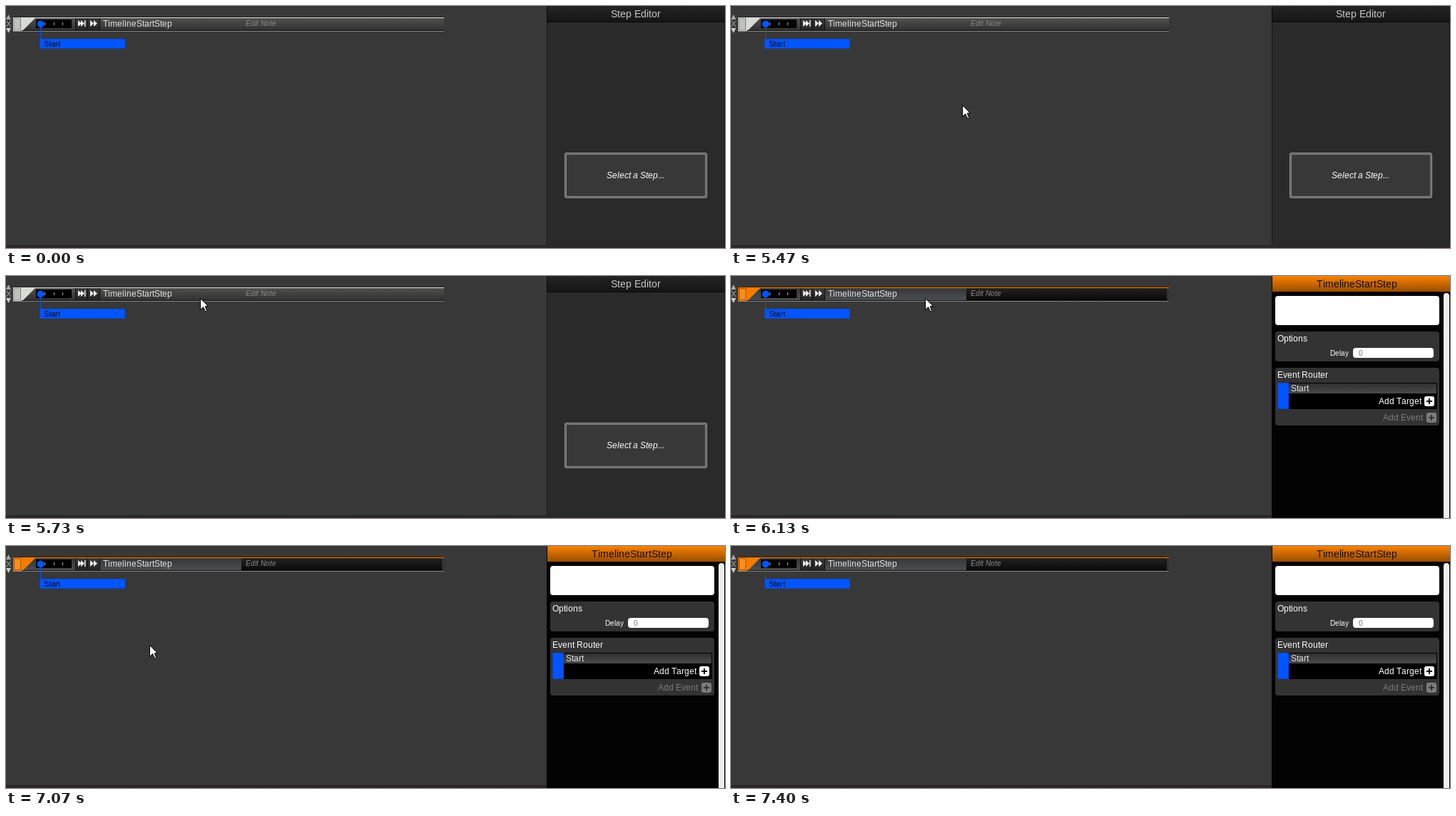
Animation, 1008 px wide and 340 px high, one loop 8.16 s. Source, as an HTML page with a canvas:

```html
<!DOCTYPE html>
<html lang="en">
<head>
<meta charset="utf-8">
<title>Timeline step editor</title>
<style>
  html, body { margin: 0; width: 100%; height: 100%; overflow: hidden; background: #383838; }
  canvas { display: block; }
</style>
</head>
<body>
<canvas id="stage" width="1008" height="340"></canvas>
<script>
const ctx = document.getElementById('stage').getContext('2d');
const LOOP = 8160, FRAME = 100 / 3;
const ENTER = 5300, SELECT = 6130, LEAVE = 6830, GONE = 7400;
const BLUE = '#0055ff', BLUE_EDGE = '#0048dc';

function rect(x, y, w, h, fill) {
  ctx.fillStyle = fill;
  ctx.fillRect(x, y, w, h);
}

function round(x, y, w, h, r, fill) {
  ctx.beginPath();
  ctx.roundRect(x, y, w, h, r);
  ctx.fillStyle = fill;
  ctx.fill();
}

function poly(fill, ...points) {
  ctx.beginPath();
  for (const [x, y] of points) ctx.lineTo(x, y);
  ctx.closePath();
  ctx.fillStyle = fill;
  ctx.fill();
}

function shade(y, h, top, bottom) {
  const g = ctx.createLinearGradient(0, y, 0, y + h);
  g.addColorStop(0, top);
  g.addColorStop(1, bottom);
  return g;
}

// Letters advance by whole pixels, as in hinted interface text.
function text(str, x, y, size, color, style = '') {
  ctx.font = `${style} ${size}px "Liberation Sans", Arial, sans-serif`;
  ctx.fillStyle = color;
  for (const letter of str) {
    ctx.fillText(letter, x, y);
    x += Math.round(ctx.measureText(letter).width);
  }
}

function playArrow(x) {
  poly('#eee', [x, 20], [x + 5, 24.5], [x, 29]);
}

function plusButton(x, y, fill, mark) {
  round(x, y, 14, 14, 3, fill);
  rect(x + 3, y + 6, 8, 2, mark);
  rect(x + 6, y + 3, 2, 8, mark);
}

function drawStepRow(selected) {
  poly('#aaa', [0, 19], [3.5, 12], [7, 19]);
  poly('#ccc', [0, 31], [3.5, 38], [7, 31]);
  text('X', 0, 29, 11, '#aaa');

  const accent = selected ? '#f57c00' : '#d8dad6';
  rect(10, 15, 604, 21, '#111');
  rect(10, 15, 604, 1, selected ? '#3a1c00' : '#222');
  rect(10, 16, 604, 1, selected ? '#ff8000' : '#e4e4e4');
  rect(11, 17, 603, 17, selected ? shade(17, 17, '#35383a', '#4b4d4f') : shade(17, 17, '#50524f', '#313131'));
  rect(10, 35, 604, 1, '#888');
  if (selected) {
    rect(330, 17, 281, 17, shade(17, 17, '#222', '#090909'));
    rect(611, 17, 3, 17, '#333');
  }

  rect(10, 16, 12, 19, accent);
  rect(11, 17, 10, 17, selected ? '#a85500' : '#888');
  rect(12, 18, 8, 15, accent);
  for (let y = 19; y < 33; y += 2)
    for (let x = 13; x < 20; x += 2) rect(x, y, 1, 1, selected ? '#ffc480' : '#777');
  poly(accent, [22, 17], [41, 17], [24, 34], [22, 34]);

  rect(42, 19, 50, 12, '#000');
  for (const x of [54, 67, 79]) rect(x, 23, 1, 4, '#aaa');

  rect(97, 17, 35, 17, '#111');
  for (const x of [98, 115]) rect(x, 17, 16, 17, shade(17, 17, '#393939', '#242424'));
  playArrow(101);
  playArrow(105);
  rect(110, 20, 1.5, 9, '#eee');
  playArrow(118);
  playArrow(123);

  text('TimelineStartStep', 136, 29, 12, '#e4e4e4');
  text('Edit Note', 336, 28, 10, '#8b8b8b', 'italic');

  rect(47, 46, 120, 14, BLUE_EDGE);
  rect(48, 47, 118, 12, BLUE);
  rect(48, 25, 1, 22, BLUE);
  ctx.beginPath();
  ctx.arc(48.5, 25.5, 5, 0, 7);
  ctx.fillStyle = BLUE;
  ctx.fill();
  text('Start', 53, 57, 11, '#020817');
}

function drawHeader(title, x, top, bottom, color) {
  rect(758, 0, 250, 23, '#080808');
  rect(759, 0, 249, 22, shade(0, 22, top, bottom));
  text(title, x, 16, 14, color);
}

function drawEmptyPanel() {
  rect(758, 0, 250, 340, '#181818');
  rect(759, 23, 248, 313, '#2a2a2a');
  drawHeader('Step Editor', 848, '#242424', '#151515', '#c8c8c8');
  round(783, 206, 200, 64, 3, '#999');
  round(784, 207, 198, 62, 2, '#555');
  round(785, 208, 196, 60, 1, '#888');
  rect(786, 209, 194, 58, '#383838');
  text('Select a Step...', 842, 242, 12, '#fff', 'italic');
}

function drawStepPanel() {
  rect(758, 0, 250, 340, '#030303');
  drawHeader('TimelineStartStep', 821, '#f98200', '#984d00', '#170b00');
  round(999, 24, 8, 330, 4, '#eee');
  round(763, 28, 230, 41, 4, '#fff');

  round(763, 78, 230, 42, 4, '#333');
  text('Options', 766, 92, 12, '#fff');
  text('Delay', 840, 112, 10, '#fff');
  round(872, 101, 113, 14, 4, '#fff');
  text('0', 880, 112, 10, '#777');

  round(763, 129, 230, 81, 4, '#333');
  text('Event Router', 766, 143, 12, '#fff');
  rect(766, 150, 16, 37, BLUE_EDGE);
  rect(767, 151, 14, 35, BLUE);
  rect(782, 150, 208, 37, '#000');
  rect(782, 151, 207, 14, shade(151, 14, '#303030', '#4a4a4a'));
  text('Start', 785, 162, 12, '#e4e4e4');
  text('Add Target', 908, 180, 12, '#fff');
  plusButton(972, 169, '#fff', '#000');
  text('Add Event', 914, 203, 12, '#7c7c7c');
  plusButton(975, 192, '#7c7c7c', '#333');
}

const stepAt = (t, start) => Math.floor((t - start + 3.4) / FRAME);

// Decelerates onto the row, rests, then accelerates off the bottom edge.
function pointerAt(t) {
  if (t < ENTER || t >= GONE) return null;
  if (t < LEAVE) {
    const left = 1 - Math.min(stepAt(t, ENTER) / 13, 1);
    return [272 + 98 * left ** 1.31, 31 + 279 * left ** 1.95];
  }
  const p = Math.min((stepAt(t, LEAVE) + 1) / 17, 1);
  return [272 - 235 * p ** 1.586, 31 + 306 * p ** 1.38];
}

function drawPointer([x, y]) {
  ctx.save();
  ctx.translate(Math.round(x) + 0.5, Math.round(y) + 0.5);
  poly('#fff', [0, 0], [0, 16], [4, 12], [7, 18], [8, 18], [9, 17], [7, 12], [7, 11], [11, 11]);
  ctx.strokeStyle = '#000';
  ctx.lineWidth = 1;
  ctx.stroke();
  ctx.restore();
}

function draw(now) {
  const t = now % LOOP;
  const selected = t >= SELECT;
  rect(0, 0, 1008, 340, '#383838');
  drawStepRow(selected);
  if (selected) drawStepPanel();
  else drawEmptyPanel();
  rect(0, 336, selected ? 758 : 1008, 4, shade(336, 4, '#262424', '#352a2c'));
  const pointer = pointerAt(t);
  if (pointer) drawPointer(pointer);
}

let start;
function tick(now) {
  start ??= now;
  draw(now - start);
  requestAnimationFrame(tick);
}
draw(0);
requestAnimationFrame(tick);
</script>
</body>
</html>
```
